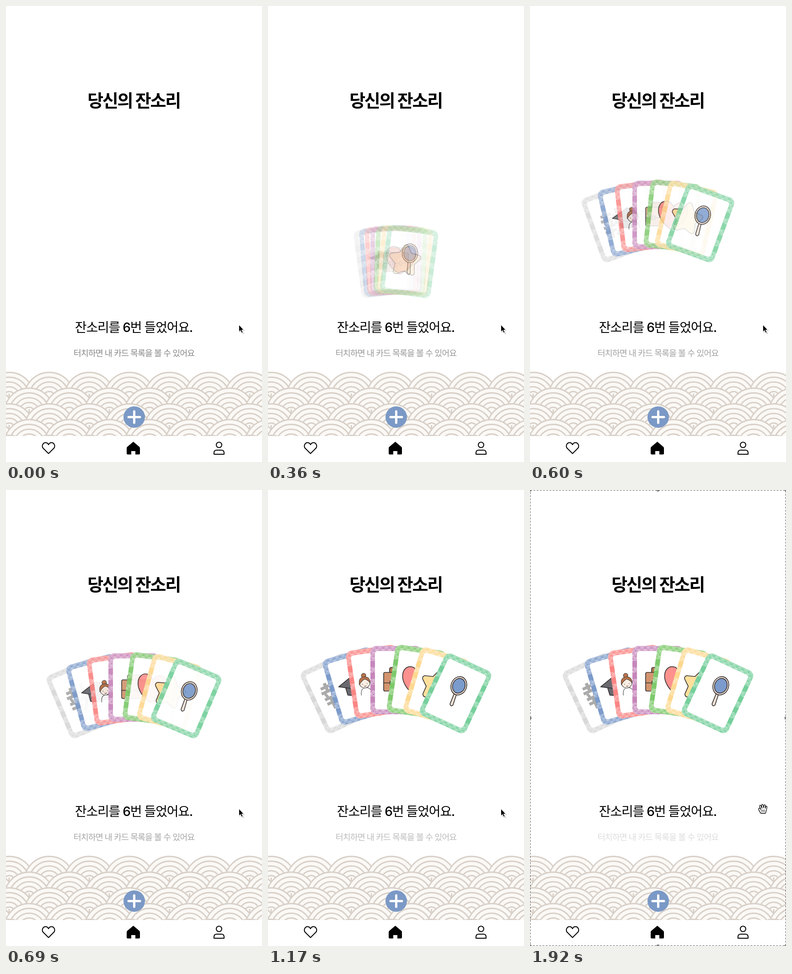
These frames come from a looping animation (560x1000 px, 1.95 s). An HTML page:

```html
<!DOCTYPE html>
<html lang="ko">
<head>
<meta charset="utf-8">
<style>
html, body { margin: 0; height: 100%; overflow: hidden; background: #fff; }
svg { display: block; width: 100vw; height: 100vh; }
text { font-family: Inter, "Noto Sans CJK KR", "Noto Sans CJK", "Noto Sans CJK JP", sans-serif; text-anchor: middle; }
.ink { stroke: #383434; stroke-width: 1.7; stroke-linejoin: round; stroke-linecap: round; }
.line { fill: none; stroke: #000; stroke-width: 2; stroke-linejoin: round; }
</style>
</head>
<body>
<svg viewBox="0 0 560 1000">
  <defs>
    <pattern id="scales" width="14" height="12" patternUnits="userSpaceOnUse">
      <path id="scaleArcs" fill="none" stroke="#fff" stroke-width=".9" stroke-opacity=".85"/>
    </pattern>
    <clipPath id="seaClip"><rect y="795" width="560" height="148"/></clipPath>
  </defs>
  <g id="cards"></g>
  <g id="sea" clip-path="url(#seaClip)" fill="#fbf9f6" stroke="#d8d0c8" stroke-width="3"></g>

  <text x="279.5" y="221" font-size="38" font-weight="700" letter-spacing="-2.3">당신의 잔소리</text>
  <text x="279.5" y="715" font-size="28" font-weight="500" letter-spacing="-1.2">잔소리를 6번 들었어요.</text>
  <text id="hint" x="280" y="768" font-size="18.5" letter-spacing="-1.05">터치하면 내 카드 목록을 볼 수 있어요</text>

  <circle cx="280.5" cy="901.5" r="23.5" fill="#7b99c6"/>
  <path d="M268 901.5h25M280.5 889v25" stroke="#fff" stroke-width="5" stroke-linecap="round"/>

  <path class="line" d="M93 981.5L81.500 970C77 965 81 957.500 86.500 957.500C90 957.500 92 960 93 962C94 960 96 957.500 99.500 957.500C105 957.500 109 965 104.500 970Z"/>
  <path d="M278.500 955.500L292 967Q293 968 293 970V981Q293 983.500 290.500 983.500H283V976H274V983.500H266.500Q264 983.500 264 981V970Q264 968 265 967Z"/>
  <g class="line">
    <circle cx="466" cy="962.500" r="6"/>
    <path d="M455 983V980Q455 974 461 974H471Q477 974 477 980V983Z"/>
  </g>

  <g id="arrow">
    <path d="M511 701v16l4-3 3 6 3-1.500-3-6h5z" fill="#000" opacity=".18"/>
    <path d="M509.500 699v15.500l3.500-3 2.500 5.500 2.600-1.200-2.500-5.300h4.400z" stroke="#fff" stroke-width="1"/>
  </g>
  <g id="selected">
    <rect x=".5" y=".5" width="559" height="999" fill="none" stroke="#555" stroke-dasharray="4 3"/>
    <path stroke="#888" stroke-width="7" stroke-linecap="round"
      d="M0 0h0M280 0h0M560 0h0M0 500h0M560 500h0M0 1000h0M280 1000h0M560 1000h0"/>
    <path d="M505 709Q501 704 500 700Q500 697 503 698L505 701L502 693Q503 690 505 692L507.500 698L506.500 691Q508 688 510 691L511 697L512 691Q514 689 515 692L514.500 698L516 694Q518 692 518.500 695Q517 704 515 709Z"
      fill="#fff" stroke="#000" stroke-width="1.300" stroke-linejoin="round"/>
    <path d="M507 701v5M510 701v5M513 701v5" stroke="#000"/>
  </g>
</svg>
<script>
const $ = id => document.getElementById(id);
const LOOP = 1950, FAN_START = 62, FAN_TIME = 785, SELECT_AT = 1830;
const RADIUS = 308, SPREAD = 25;

// Overlapping rows of concentric circles, each row covering the one above
function drawSea() {
  const step = 87.7;
  let out = "";
  for (let row = 0; row < 5; row++) {
    const y = 858 + row * 34.5;
    for (let i = -4; i < 5; i++) {
      const x = 270 + (i + (row % 2) / 2) * step;
      for (let r = 54.5; r > 5; r -= 10.5) out += `<circle cx="${x}" cy="${y}" r="${r}"/>`;
      if (i % 2) out += `<path d="M${x} ${y - 8}v24"/>`;
    }
  }
  $("sea").innerHTML = out;
}

const halfArc = (x, y, r) => `M${x - r} ${y}a${r} ${r} 0 0 1 ${2 * r} 0`;
$("scaleArcs").setAttribute("d",
  [6.5, 4.3, 2].map(r => halfArc(7, 6.5, r) + halfArc(0, 12.5, r) + halfArc(14, 12.5, r)).join(""));

const starPoints = Array.from({ length: 10 }, (_, i) => {
  const r = i % 2 ? 16 : 30, a = i * Math.PI / 5;
  return [r * Math.sin(a), -r * Math.cos(a)].map(v => v.toFixed(1)).join();
}).join(" ");
const star = (color, width) =>
  `<polygon points="${starPoints}" fill="${color}" stroke="${color}" stroke-width="${width}" stroke-linejoin="round"/>`;

const cards = [
  ["#d8d8d8", `<text y="23" font-size="64" font-weight="900" fill="#aaa">執</text>`],
  ["#7c9bca", `<g class="ink" fill="#696a70"><path d="M-22-4V14Q0 25 22 14V-4Z"/>
    <path d="M-36-9L0-24L36-9L0 7Z"/><path d="M0-9L28-4V14" fill="none"/></g>`],
  ["#fa8583", `<g class="ink" style="stroke-width:1">
    <path d="M-35 25Q-35 10-24 10Q-12 10-11 25" fill="#fff"/>
    <circle cx="-24" cy="-17" r="5" fill="#b9744b"/>
    <circle cx="-24" cy="-1" r="11.500" fill="#fdeee2"/>
    <path d="M-36 2Q-37-14-24-14Q-11-14-12 2Q-15-6-23-9Q-31-6-36 2Z" fill="#b9744b"/>
    <path d="M-29 1v1M-19 1v1M-26 6q2 2 4 0" fill="none"/></g>`],
  ["#c686bb", `<g class="ink" fill="#d3956f">
    <path d="M-14-17V-24Q-14-28-10-28H10Q14-28 14-24V-17" fill="#b87850"/>
    <rect x="-27" y="-17" width="54" height="41" rx="3"/>
    <path d="M-27 6H27"/><rect x="-13" y="2" width="6" height="8"/><rect x="7" y="2" width="6" height="8"/></g>`],
  ["#7dc96b", `<path class="ink" fill="#fc918e" d="M0 30C-18 20-32 5-32-12C-32-34-7-37 0-19C7-37 32-34 32-12C32 5 18 20 0 30Z"/>`],
  ["#fdd88f", star("#383434", 13) + star("#ffdf9b", 9.6)],
  ["#75cf9b", `<g class="ink" fill="#f6e4d8" transform="translate(0 -2) rotate(-5)">
    <path d="M-2.500 0L-3.500 28Q0 34 3.500 28L2.500 0Z"/>
    <ellipse cx="1" cy="-16" rx="17" ry="20.500"/>
    <ellipse cx="1" cy="-16" rx="13.500" ry="16.500" fill="#7b9bcc"/></g>`]
];

function cardMarkup([color, icon]) {
  const blocks = [-42, -16, 10, 36].map(y =>
    `<path d="M-56 ${y}h112v13h-112z"/>`).join("");
  return `<g><g fill="${color}"><rect x="-56" y="-75" width="112" height="150" rx="13"/>
    <rect x="-56" y="-75" width="112" height="150" rx="13" fill="url(#scales)"/>${blocks}</g>
    <rect x="-46" y="-64" width="92" height="128" rx="6" fill="#fff"/>${icon}</g>`;
}

// Ease in and out, cubic Bézier (.42, 0, .58, 1)
function ease(x) {
  if (x <= 0) return 0;
  if (x >= 1) return 1;
  let lo = 0, hi = 1;
  for (let i = 0; i < 20; i++) {
    const s = (lo + hi) / 2, u = 1 - s;
    if (1.26 * u * u * s + 1.74 * u * s * s + s ** 3 < x) lo = s; else hi = s;
  }
  return lo * lo * (3 - 2 * lo);
}

drawSea();
$("cards").innerHTML = cards.map(cardMarkup).join("");
const cardNodes = [...$("cards").children];

function draw(now) {
  const t = now % LOOP;
  const p = ease((t - FAN_START) / FAN_TIME);
  const sideways = p * (0.7 + 0.3 * p * p), sag = p ** 2.2;
  cardNodes.forEach((node, i) => {
    const degrees = SPREAD * (i - 3) / 3, a = degrees * Math.PI / 180;
    const x = 280 + RADIUS * Math.sin(a) * sideways;
    const y = 417 + 202 * (1 - p) + RADIUS * (1 - Math.cos(a)) * sag;
    node.setAttribute("transform", `translate(${x} ${y}) rotate(${degrees * p})`);
    node.setAttribute("opacity", p ** 0.8);
  });
  const gray = Math.round(136 + 85 * t / LOOP);
  $("hint").setAttribute("fill", `rgb(${gray},${gray},${gray})`);
  const selected = t >= SELECT_AT;
  $("selected").style.display = selected ? "" : "none";
  $("arrow").style.display = selected ? "none" : "";
}

function tick() {
  draw(performance.now());
  requestAnimationFrame(tick);
}
tick();
</script>
</body>
</html>
```
